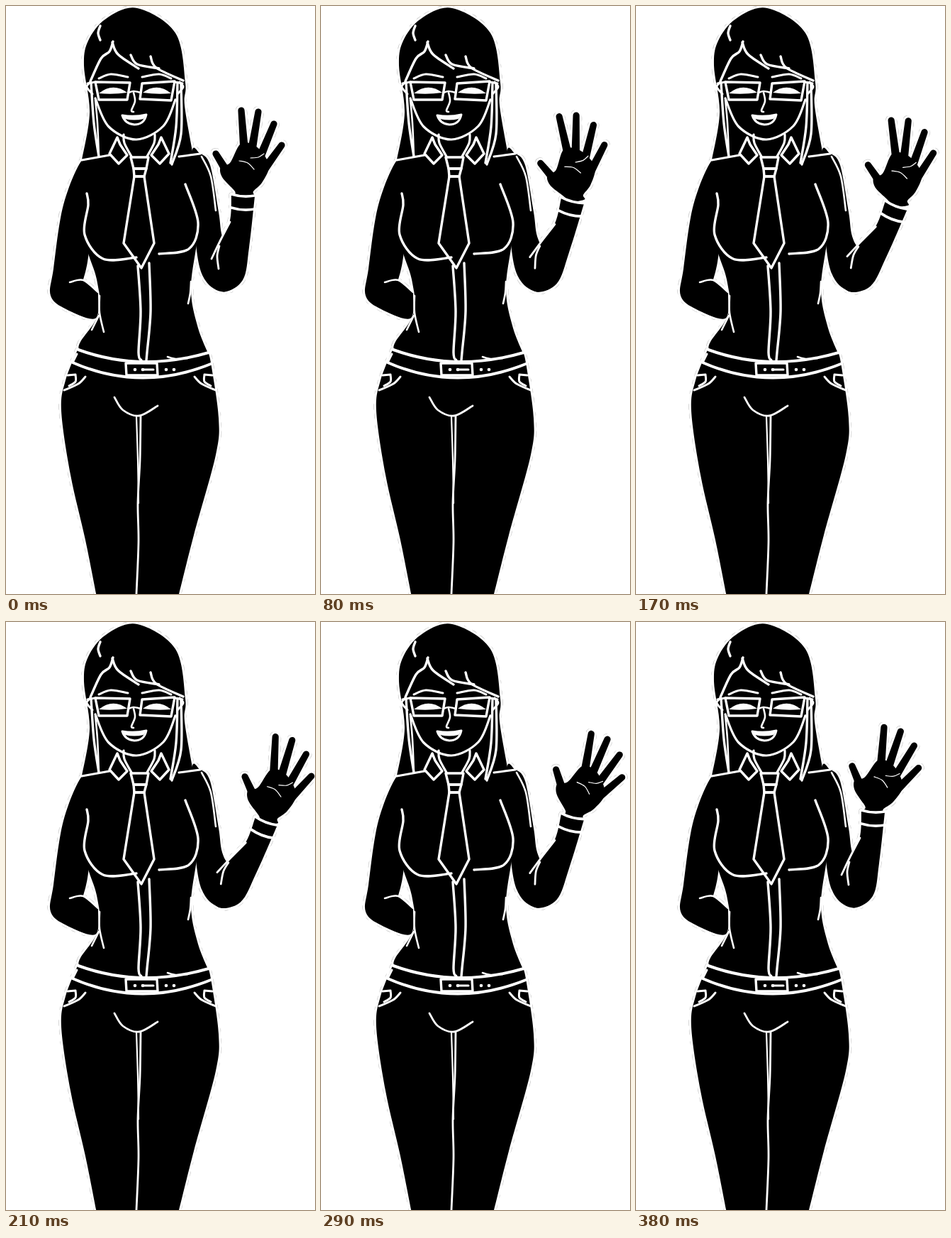
These frames come from a looping animation (436 by 828 pixels, 420 ms). An HTML page:

```html
<!DOCTYPE html>
<html lang="en">
<head>
<meta charset="utf-8">
<title>Waving figure</title>
<style>
html, body { margin: 0; width: 100%; height: 100%; overflow: hidden; background: #fff; }
svg { display: block; width: 436px; height: 828px; }
path { stroke-linecap: round; stroke-linejoin: round; }
.fringe { fill: none; stroke: #bbb; stroke-width: 7; stroke-dasharray: 3 13 1 17 5 9; }
.halo { fill: #fff; stroke: #fff; stroke-width: 6; }
.ink { fill: #000; }
.line { fill: none; stroke: #fff; }
</style>
</head>
<body>
<svg id="stage" viewBox="0 0 436 828"></svg>
<script>
const NS = 'http://www.w3.org/2000/svg';
const stage = document.getElementById('stage');

function add(parent, tag, attrs = {}) {
  const el = document.createElementNS(NS, tag);
  for (const key in attrs) el.setAttribute(key, attrs[key]);
  return parent.appendChild(el);
}

// Smooth curve through key points; a doubled point makes a corner.
function curve(text, closed) {
  const p = text.trim().split(/\s+/).map(s => s.split(',').map(Number));
  const n = p.length;
  const at = i => closed ? p[(i + n) % n] : p[Math.max(0, Math.min(n - 1, i))];
  let d = 'M' + p[0];
  for (let i = 0; i < (closed ? n : n - 1); i++) {
    const [a, b, c, e] = [-1, 0, 1, 2].map(k => at(i + k));
    if (String(b) === String(c)) continue;
    const c1 = b.map((v, k) => v + (c[k] - a[k]) / 6);
    const c2 = c.map((v, k) => v - (e[k] - b[k]) / 6);
    d += `C${c1} ${c2} ${c}`;
  }
  return d + (closed ? 'Z' : '');
}

const stroke = (parent, width, d) => add(parent, 'path', { d, class: 'line', 'stroke-width': width });
const draw = (parent, width, ...lines) => lines.forEach(t => stroke(parent, width, curve(t)));
const poly = (parent, points) => stroke(parent, 3.4, `M${points}Z`);

// Draws the same thing twice, the second time mirrored about x = axis.
function pair(axis, fn) {
  fn(add(stage, 'g'));
  fn(add(stage, 'g', { transform: `translate(${2 * axis} 0) scale(-1 1)` }));
}

// Rounded finger that thickens from tip to base.
function finger([x, y, bx, by]) {
  const len = Math.hypot(bx - x, by - y);
  const nx = (by - y) / len, ny = (x - bx) / len;
  const r = 4.6, R = 5.8;
  return `M${bx + nx * R} ${by + ny * R}L${x + nx * r} ${y + ny * r}` +
    `A${r} ${r} 0 0 0 ${x - nx * r} ${y - ny * r}L${bx - nx * R} ${by - ny * R}Z`;
}

const head = `185,3 141,18 116,49 110,84 118,150 107,217 107,217
  186,226 264,210 264,210 252,140 253,108 239,38`;
const torso = `107,217 107,217 264,209 274,208 274,208 272,310 261,395 270,450 286,491 286,491
  190,504 103,484 103,484 105,473 131,432 128,385 111,325`;
const backArm = `108,216 81,280 67,370 63,408 85,427 126,440 130,404 130,404 109,386 109,386 117,345 125,230`;
const upperArm = `262,210 274,208 288,224 300,290 307,330 333,373 310,402 281,386 268,335`;
const legs = `101,484 101,484 84,527 78,570 91,660 112,752 128,832 128,832
  243,832 243,832 265,745 296,632 300,580 290,508 286,489 286,489`;
const forearm = `318,266 318,266 316,302 302,331 288,372 305,402 334,386 343,340 351,268 351,268`;
const palm = `331,194 350,196 365,211 371,228 361,249 349,261 349,268 323,268 323,261 305,241 303,226 316,221`;
const fingers = [[332, 147, 336, 200], [356, 149, 347, 202], [378, 166, 359, 212],
  [389, 196, 363, 232], [296, 208, 312, 234]];

const outlines = [head, torso, backArm, upperArm, legs].map(t => curve(t, true));
const handShape = [curve(palm, true), ...fingers.map(finger)];

const arms = [], hands = [];
function armGroups() {
  const arm = add(stage, 'g'), hand = add(arm, 'g');
  arms.push(arm);
  hands.push(hand);
  return [arm, hand];
}

for (const cls of ['fringe', 'halo', 'ink']) {
  const fill = (parent, d) => add(parent, 'path', { d, class: cls });
  outlines.forEach(d => fill(stage, d));
  const [arm, hand] = armGroups();
  fill(arm, curve(forearm, true));
  handShape.forEach(d => fill(hand, d));
}

const [armLines, handLines] = armGroups();
for (const y of [265, 284]) stroke(armLines, 3.8, `M318 ${y}Q334 ${y + 5} 351 ${y + 2}`);
draw(armLines, 2.8, '316,304 302,331 290,356', '301,338 298,352 300,370');
draw(handLines, 1.2, '329,218 341,221 350,230', '345,214 356,213 364,208');

// hair
draw(stage, 3.4,
  '133,28 130,38 133,48',
  '151,50 146,64 134,74 119,106',
  '150,51 158,68 187,88',
  '176,69 185,82 216,88',
  '204,71 212,87 250,105',
  '120,108 124,165 131,212',
  '242,108 240,170 232,221',
  '247,109 247,180 234,223');
draw(stage, 2.6, '126,132 129,165 131,212');

// face
draw(stage, 3.2, '126,130 145,170 184,188 222,169 239,132');
draw(stage, 2.6, '180,122 182,134 177,147 180,149', '173,122 180,120 190,122');
poly(stage, '126,107 175,108 171,132 131,132');
poly(stage, '192,109 238,106 233,133 189,131');
pair(182, side => {
  draw(side, 3, '131,102 148,96 172,100', '119,107 114,114 122,124', '115,109 126,107');
  add(side, 'path', { d: 'M131 123Q151 107 171 122Q151 125 131 123Z', fill: '#fff' });
});
stroke(stage, 3, 'M164 154Q181 157 198 153Q195 167 181 167Q168 166 164 154Z');
add(stage, 'path', { d: 'M164 154Q181 157 198 153L194 159Q181 162 168 159Z', fill: '#fff' });

// collar and tie
pair(188, side => {
  draw(side, 3.2, '166,181 167,193 177,212');
  poly(side, '157,185 146,208 159,222 171,210 161,195');
});
draw(stage, 3, '107,217 146,210', '244,212 274,208');
poly(stage, '176,213 201,213 198,229 180,229');
poly(stage, '180,229 198,229 195,240 181,240');
poly(stage, '181,240 166,334 191,369 209,334 195,240');

// shirt
draw(stage, 3.4,
  '114,264 116,280 111,322 137,356 184,354',
  '253,251 271,305 258,342 216,349',
  '186,366 190,430 187,488 191,499',
  '202,362 204,430 199,488 198,499');
draw(stage, 2.6,
  '276,212 289,240 296,288',
  '90,389 109,386 130,403',
  '132,408 132,432 138,459',
  '131,436 121,456',
  '261,388 260,404 257,419',
  '228,494 240,497 256,496');

// belt
stroke(stage, 4, 'M102 484Q190 516 286 488');
stroke(stage, 4, 'M94 502Q190 544 289 504');
poly(stage, '169,503 213,503 214,520 170,520');
draw(stage, 3, '193,512 208,512', '100,490 94,502');
for (const x of [182, 193, 226, 237])
  add(stage, 'circle', { cx: x, cy: 512, r: 2.3, fill: '#fff' });

// trousers
pair(189, side => draw(side, 3, '82,541 102,532 112,522', '87,520 98,519 98,519 98,529 89,535'));
draw(stage, 2.8, '153,551 165,569 188,577 214,563', '190,578 189,640 186,700 187,755 184,828');
draw(stage, 2.2, '184,578 186,640 187,700');

const FPS = 24, FRAMES = 10, LOOP = 420;
const handKeys = [[0, 0], [3, -13], [5, 7], [7, 14], [8, 22], [10, -4]];

function between(keys, t) {
  const i = keys.findIndex(k => k[0] > t);
  const [[t0, a], [t1, b]] = [keys[i - 1], keys[i]];
  return a + (b - a) * (t - t0) / (t1 - t0);
}

function render(ms) {
  // Frame starts are rounded to whole hundredths of a second.
  const cs = Math.floor(ms % LOOP / 10);
  const frame = Math.ceil((cs + 0.5) * FPS / 100) - 1;
  const swing = Math.max(0, Math.sin(Math.PI * frame / (FRAMES - 1)));
  const arm = 17.8 * swing ** 1.15;
  const tilt = between(handKeys, frame) - arm;
  arms.forEach(g => g.setAttribute('transform', `rotate(${arm} 305 380)`));
  hands.forEach(g => g.setAttribute('transform', `rotate(${tilt} 333 262)`));
}

const start = performance.now();
function tick() {
  render(performance.now() - start);
  requestAnimationFrame(tick);
}
tick();
</script>
</body>
</html>
```
